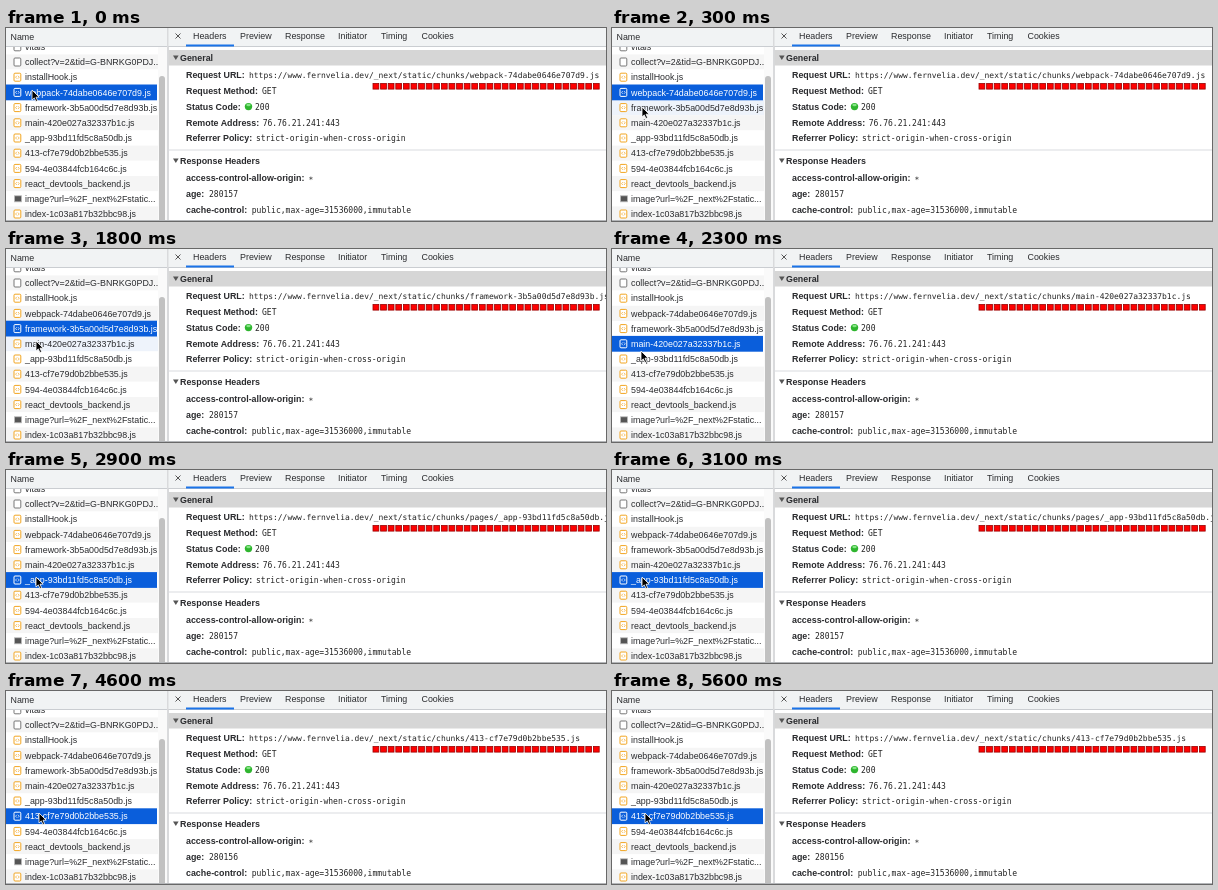
Write an HTML page that moves like this. It is 600 px wide and 193 px high and loops after 5.7 s.

```html
<!DOCTYPE html>
<html lang="en">
<head>
<meta charset="utf-8">
<title>Network panel</title>
<style>
  html, body { margin: 0; width: 100%; height: 100%; overflow: hidden; background: #fff; }
  svg { display: block; width: 600px; height: 193px; }
  text { font: 8.9px "Liberation Sans", Arial, sans-serif; fill: #2a2b2e; white-space: pre; }
  .bold { font-weight: 700; }
  .mono { font: 8.03px "DejaVu Sans Mono", monospace; fill: #222; }
  .url { font-size: 7.97px; }
  .selected { fill: #fff; }
</style>
</head>
<body>
<svg id="stage" viewBox="0 0 600 193"></svg>
<script>
const LOOP = 5700, STEP = 100;
const ROW_TOP = 11.2, ROW_HEIGHT = 15.2;
const ORANGE = '#f2a520', GREY = '#777';

const files = [
  'vitals', 'collect?v=2&amp;tid=G-BNRKG0PDJ...', 'installHook.js',
  'webpack-74dabe0646e707d9.js', 'framework-3b5a00d5d7e8d93b.js',
  'main-420e027a32337b1c.js', '_app-93bd11fd5c8a50db.js',
  '413-cf7e79d0b2bbe535.js', '594-4e03844fcb164c6c.js',
  'react_devtools_backend.js', 'image?url=%2F_next%2Fstatic...',
  'index-1c03a817b32bbc98.js'
];

// [time, selected row]
const clicks = [[0, 3], [800, 4], [1900, 5], [2800, 6], [4500, 7]];

// [time, x, y] of the pointer tip
const pointerPath = [
  [0, 26, 62], [300, 30, 79], [1400, 30, 79], [1700, 30, 92], [1900, 30, 92],
  [2200, 29, 102], [2400, 29, 102], [2600, 30, 107], [3400, 30, 107],
  [3700, 33, 123], [4400, 33, 123], [4600, 33, 122], [LOOP, 33, 122]
];

const rect = (x, y, w, h, fill, extra = '') =>
  `<rect x="${x}" y="${y}" width="${w}" height="${h}" fill="${fill}" ${extra}/>`;
const label = (x, y, content, cls = '') => `<text x="${x}" y="${y}" class="${cls}">${content}</text>`;
const path = (d, stroke, extra = '') => `<path d="${d}" fill="none" stroke="${stroke}" ${extra}/>`;

function pointerAt(t) {
  const next = Math.max(1, pointerPath.findIndex(p => p[0] >= t));
  const [t0, x0, y0] = pointerPath[next - 1], [t1, x1, y1] = pointerPath[next];
  const k = (t - t0) / (t1 - t0);
  return [x0 + (x1 - x0) * k, y0 + (y1 - y0) * k];
}

function icon(row, y, selected) {
  const name = files[row], isScript = name.endsWith('.js');
  if (name.startsWith('image'))
    return rect(8.5, y - 3, 7, 6, '#555', 'stroke="#bbb" stroke-width=".8"');
  const color = selected ? '#fff' : isScript ? ORANGE : GREY;
  const frame = rect(8, y - 4, 6.8, 8, selected ? 'none' : '#fff', `rx="1" stroke="${color}"`);
  const brackets = path(`M10.8 ${y - 1.4} l-1.2 1.4 1.2 1.4 M12 ${y - 1.4} l1.2 1.4 -1.2 1.4`, color, 'stroke-width=".7"');
  return frame + (isScript ? brackets : '');
}

function fileRow(row, selected, hovered) {
  const top = ROW_TOP + row * ROW_HEIGHT, middle = top + ROW_HEIGHT / 2;
  const fill = hovered ? '#eef3fb' : row % 2 ? '#f5f5f5' : '#fff';
  const background = selected
    ? rect(0, top - 0.3, 151, ROW_HEIGHT + 0.6, '#0a5edb')
    : rect(0, top, 152, ROW_HEIGHT, fill);
  return background + icon(row, middle, selected)
    + label(19, middle + 3.2, files[row], selected ? 'selected' : '');
}

function fileList(selected, hovered) {
  const order = files.map((_, i) => i).sort((a, b) => (a === selected) - (b === selected));
  return `<svg width="152" height="193">${order.map(i => fileRow(i, i === selected, i === hovered)).join('')}</svg>`
    + rect(0, 0, 161, 18, '#f1f3f4') + rect(0, 18, 161, 1, '#cacdd1') + label(4.5, 12, 'Name')
    + rect(152, 19, 9, 174, '#fafafa') + rect(153, 48, 6, 150, '#c1c1c1', 'rx="3"')
    + rect(161.5, 0, 1, 193, '#b4b6b9');
}

function tabBar() {
  const tabs = [[187, 'Headers'], [234, 'Preview'], [279, 'Response'], [332, 'Initiator'], [375, 'Timing'], [415.5, 'Cookies']];
  return rect(162.5, 0, 438, 18, '#f1f3f4') + rect(162.5, 18, 438, 1, '#cacdd1')
    + path('M169.5 5.5 l5 5 m0 -5 l-5 5', '#555')
    + tabs.map(([x, name]) => label(x, 11.2, name)).join('')
    + rect(180, 16.5, 48, 2, '#1a73e8');
}

const heading = (y, name) =>
  `<path d="M167 ${y - 5} h5.6 l-2.8 4.6 z" fill="#555"/>` + label(174, y, name, 'bold');
const field = (y, name, x, value, cls = '') =>
  label(180, y, name + ':', 'bold') + label(x, y, value, 'mono ' + cls);

function underline() {
  return Array.from({ length: 30 }, (_, i) =>
    rect(367 + i * 7.6, 55.5, 5.8, 5.6, '#f00', 'stroke="#900" stroke-width=".8"')).join('');
}

function details(selected) {
  const folder = selected === 6 ? 'pages/' : '';
  const url = `https://www.fernvelia.dev/_next/static/chunks/${folder}${files[selected]}`;
  return rect(162.5, 22, 438, 15.5, '#d6d6d6')
    + heading(32.5, 'General')
    + field(50, 'Request URL', 243, url, 'url')
    + field(66, 'Request Method', 256, 'GET')
    + field(82, 'Status Code', 249, '200')
    + '<circle cx="242.5" cy="78.6" r="3.7" fill="#2fb52f"/><ellipse cx="242.5" cy="77" rx="2.2" ry="1.3" fill="#84e584"/>'
    + field(97.6, 'Remote Address', 256.7, '76.76.21.241:443')
    + field(113.2, 'Referrer Policy', 249.9, 'strict-origin-when-cross-origin')
    + rect(162.5, 121.5, 438, 1, '#dadce0')
    + heading(135.5, 'Response Headers')
    + field(153.3, 'access-control-allow-origin', 302.5, '∗')
    + field(169, 'age', 203, selected === 7 ? '280156' : '280157')
    + field(184.8, 'cache-control', 245.8, 'public,max-age=31536000,immutable')
    + underline();
}

const pointer = (x, y) =>
  `<path transform="translate(${x} ${y})" d="M0 0 V10 L2.3 7.9 L3.9 11.5 L5.6 10.7 L4 7.2 H7.2 Z" fill="#000" stroke="#fff" stroke-width=".8"/>`;

function render(t) {
  const selected = clicks.filter(([time]) => time <= t).pop()[1];
  const [x, y] = pointerAt(t);
  const hovered = Math.floor((y - ROW_TOP) / ROW_HEIGHT);
  return rect(0, 0, 600, 193, '#fff') + fileList(selected, hovered) + tabBar() + details(selected)
    + rect(0, 192, 600, 1, '#b4b6b9') + pointer(x, y);
}

const stage = document.getElementById('stage');
const start = performance.now();
let shown = -1;

function tick() {
  const t = Math.floor((performance.now() - start) % LOOP / STEP) * STEP;
  if (t !== shown) stage.innerHTML = render(shown = t);
  requestAnimationFrame(tick);
}
tick();
</script>
</body>
</html>
```
